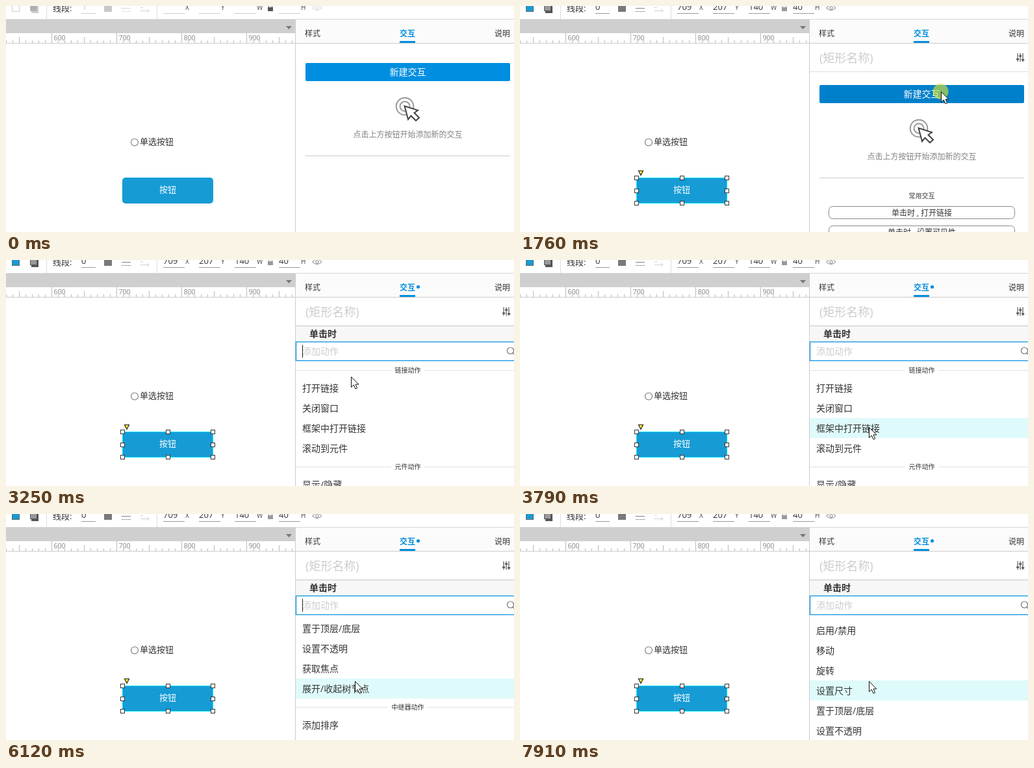
Animation of 782 by 349 pixels, one loop 8000 ms. Source, as an HTML page:

```html
<!DOCTYPE html>
<html lang="zh-CN">
<head>
<meta charset="utf-8">
<title>交互面板</title>
<style>
html, body { margin: 0; width: 100%; height: 100%; overflow: hidden; background: #fff; }
svg { display: block; width: 782px; height: 349px; font-family: "Open Sans", "Noto Sans CJK SC", "Noto Sans CJK", sans-serif; }
</style>
</head>
<body>
<svg id="stage" viewBox="0 0 782 349"></svg>
<script>
const LOOP = 8000;
const BLUE = '#008fe0', INK = '#333', HOVER = '#dffafa', LINE = '#ccc';

// --- drawing helpers ---
const rect = (x, y, w, h, fill, more = '') =>
  `<rect x="${x}" y="${y}" width="${w}" height="${h}" fill="${fill}" ${more}/>`;
const path = (d, stroke, width = 1, fill = 'none') =>
  `<path d="${d}" stroke="${stroke}" stroke-width="${width}" fill="${fill}"/>`;
const circle = (x, y, r, stroke, width = 1, fill = 'none') =>
  `<circle cx="${x}" cy="${y}" r="${r}" stroke="${stroke}" stroke-width="${width}" fill="${fill}"/>`;
// cy is the middle of the glyphs
const text = (s, x, cy, size, fill = INK, more = '') =>
  `<text x="${x}" y="${Math.round(cy + size * 0.38)}" font-size="${size}" fill="${fill}" ${more}>${s}</text>`;
const mid = (s, x, cy, size, fill, more = '') =>
  text(s, x, cy, size, fill, `text-anchor="middle" ${more}`);
const group = (id, body, more = '') => `<g id="${id}" ${more}>${body}</g>`;

// --- toolbar ---
const fields = [[242, 'X', '709'], [297, 'Y', '207'], [352, 'W', '140'], [420, 'H', '40']];

function tools(on) {
  const line = on ? '#999' : '#ccc';
  const soft = on ? '#808080' : '#d4d4d4';
  const number = (s, x) => `<text x="${x}" y="6" font-size="13" fill="${on ? INK : '#bbb'}">${s}</text>`;
  let s = rect(9.5, -3.5, 11, 12, on ? '#169bd5' : '#fff', `stroke="${on ? '#666' : '#ccc'}"`)
    + rect(39, 0, 11, 11, on ? '#555' : '#ccc')
    + rect(37.5, -3.5, 10, 11, on ? '#999' : '#b0b0b0', `stroke="${on ? '#555' : '#bbb'}"`)
    + number(on ? 0 : 1, on ? 116 : 117) + rect(116, 11, 22, 1, line)
    + rect(151, -3, 12, 12, on ? '#797979' : '#c8c8c8')
    + path('M178 3.5H192', soft) + path('M178 8.5H192', soft, 1, 'none" stroke-dasharray="2 1')
    + path('M207 2.5H211M207 7.5H220M217 4.5L220 7.5L217 10.5', '#d0d0d0')
    + path('M471.5 3Q479 -5 486 3Q479 10 471.5 3Z', soft) + circle(479, 3, 2.2, soft)
    + rect(403, 2, 8, 6, on ? '#999' : '#555') + path('M404.5 2V-1H409.5V2', on ? '#999' : '#555');
  for (const [x, , value] of fields)
    s += rect(x, 11, 33, 1, line) + (on ? number(value, x) : '');
  return s;
}

function frame() {
  let s = rect(62, 0, 1, 20, '#ddd') + rect(232, 0, 1, 20, '#ddd')
    + `<text x="72" y="8" font-size="13" fill="${INK}">线段:</text>`;
  for (const [x, name] of fields)
    s += `<text x="${x + 34}" y="6" font-size="10" fill="#444">${name}</text>`;
  s += rect(0, 20, 782, 1, '#d8d8d8') + rect(0, 21, 445, 21, '#cfcfcf')
    + path('M431 31H440L435.5 36Z', 'none', 0, '#777');
  for (let x = 0; x < 445; x += 10) {
    const top = x % 100 === 70 ? 42 : x % 100 === 20 ? 48 : 53;
    s += rect(x, top, 1, 57 - top, '#bbb');
  }
  for (let i = 0; i < 4; i++)
    s += `<text x="${73.5 + i * 100}" y="53" font-size="10.5" fill="#888">${600 + i * 100}</text>`;
  s += rect(0, 57, 445, 1, LINE) + rect(445, 21, 1, 328, LINE)
    + rect(446, 21, 336, 36, '#fbfbfb') + rect(446, 57, 336, 1, LINE)
    + text('样式', 460, 42, 12) + text('说明', 752, 42, 12)
    + text('交互', 606, 42, 12, BLUE, 'font-weight="700"') + rect(606, 54, 24, 3, BLUE);
  return s;
}

// --- canvas widgets ---
function widgets() {
  return circle(198, 210.5, 5.5, '#777', 1.1, '#fff') + text('单选按钮', 206, 209.5, 13)
    + rect(179, 265, 140, 40, '#169bd5', 'rx="5"') + mid('按钮', 249, 283.5, 13, '#fff');
}

function selection() {
  let s = rect(179.5, 265.5, 139, 39, '#169bd5', 'stroke="#00e0ff"')
    + mid('按钮', 249, 283.5, 13, '#fff')
    + path('M182.5 254.5H189.5L186 261.5Z', '#222', 1.2, '#ffe92e');
  for (const x of [179.5, 249.5, 318.5])
    for (const y of [265.5, 285.5, 304.5])
      if (x !== 249.5 || y !== 285.5) s += rect(x - 3, y - 3, 6, 6, '#fff', 'stroke="#333"');
  return s;
}

// --- panels ---
const startBlock = id => rect(461, 88, 315, 28, BLUE, `rx="2" id="${id}"`)
  + mid('新建交互', 618.5, 102, 14, '#fff')
  + circle(614, 155, 13.3, '#999', 2) + circle(614, 155, 7.5, '#999', 2)
  + path('M613.5 154.5L619 175L623.5 169.5L631 177L636 172.5L628.5 165L634 161Z', '#444', 2, '#fff')
  + mid('点击上方按钮开始添加新的交互', 618.5, 198.5, 12, '#808080')
  + rect(461, 231, 315, 1, LINE);

function nameRow() {
  let s = text('(矩形名称)', 461, 80, 18, '#ccc') + rect(446, 101, 336, 1, '#ddd');
  [[766, 81], [770, 76], [774, 82]].forEach(([x, y]) =>
    s += rect(x - 0.5, 73, 1.2, 13, '#555') + rect(x - 1.8, y, 4, 2.4, '#555'));
  return s;
}

const common = () => mid('常用交互', 618.5, 293, 10, '#777', 'font-weight="600"')
  + ['打开链接', '设置可见性'].map((s, i) =>
    rect(475.5, 309.5 + i * 30, 286, 19, '#fff', 'rx="6" stroke="#888"')
    + mid('单击时 , ' + s, 618.5, 319 + i * 30, 12, INK)).join('');

const search = (y, x, hint, caretId) => rect(446.5, y + 0.5, 340, 29, '#fff', `stroke="${BLUE}" stroke-width="1.2"`)
  + text(hint, x, y + 14.5, 14, '#ccc') + rect(x, y + 5, 1, 20, '#222', `id="${caretId}"`)
  + circle(776.5, y + 14, 5, '#777', 1.2) + path(`M780 ${y + 17.5}L784 ${y + 22}`, '#777', 1.2);

const divider = (s, y) => {
  const half = s.length * 5 + 5.5;
  return rect(446, y, 172.5 - half, 1, '#e2e2e2') + rect(618.5 + half, y, 163.5 - half, 1, '#e2e2e2')
    + mid(s, 618.5, y, 10, INK);
};

const events = ['单击时', '双击时', '鼠标右击时', '鼠标按下时', '鼠标松开时', '鼠标移动时', '鼠标移入时'];
const eventList = () => divider('事件', 146) + rect(446, 158, 336, 30, HOVER, 'id="eventHover"')
  + events.map((s, i) => text(s, 461, 173 + i * 30, 14)).join('');

const actions = {
  链接动作: '打开链接 关闭窗口 框架中打开链接 滚动到元件',
  元件动作: '显示/隐藏 设置面板状态 设置文本 设置图片 设置选中 设置列表选中项 启用/禁用 移动 旋转 设置尺寸 置于顶层/底层 设置不透明 获取焦点 展开/收起树节点',
  中继器动作: '添加排序 移除排序 添加筛选 移除筛选 设置当前显示页面 设置每页项目数量'
};
const rows = [];
function actionList() {
  let y = 170, s = '';
  for (const title in actions) {
    s += divider(title, y);
    y += 28;
    for (const name of actions[title].split(' ')) {
      rows.push(y);
      s += text(name, 456, y, 14);
      y += 31;
    }
    y -= 3;
  }
  return rect(446, 0, 336, 31, HOVER, 'id="actionHover"') + s;
}

const stage = document.getElementById('stage');
stage.innerHTML = '<clipPath id="listArea"><rect x="446" y="157" width="336" height="192"/></clipPath>'
  + frame() + group('toolsOff', tools(false)) + group('toolsOn', tools(true))
  + widgets() + rect(179.5, 265.5, 139, 39, 'none', 'rx="5" stroke="#00c8ff" id="outline"')
  + group('selected', selection())
  + group('emptyPanel', startBlock('plainButton'))
  + group('named', nameRow())
  + group('startPanel', group('shifted', startBlock('newButton'), 'transform="translate(0 34)"') + common())
  + group('eventPanel', search(102, 461, '添加交互或交互样式', 'eventCaret') + eventList())
  + group('actionPanel', circle(634.5, 41.5, 2.6, 'none', 0, BLUE)
    + rect(446, 102, 336, 24, '#f7f7f7') + rect(446, 101, 336, 1.5, '#d4d4d4')
    + text('单击时', 467, 114, 14, INK, 'font-weight="700"')
    + `<g clip-path="url(#listArea)">${group('list', actionList())}</g>`
    + search(126, 456, '添加动作', 'actionCaret'))
  + group('cursor', circle(-0.5, 0, 12, 'none', 0, '#d8e32e" fill-opacity=".62" id="press')
    + path('M.5 .5V16.5L4.3 13L7 19L9.6 17.9L7 12H11.8Z', '#111', 1, '#fff'));

const el = {};
stage.querySelectorAll('[id]').forEach(n => el[n.id] = n);

// --- timeline ---
// stepped pointer moves: first step, last step, count, end x, end y
const moves = [
  [210, 210, 1, 229, 333], [370, 660, 4, 218, 273], [1140, 1380, 4, 668, 153],
  [1600, 1760, 3, 648, 132], [1910, 2380, 7, 589, 171], [2460, 2610, 2, 583, 174],
  [2780, 3250, 6, 531, 180], [3330, 3560, 4, 536, 240], [3630, 3780, 3, 537, 258]
];
const scrolls = [[0, 0], [3860, 120], [4010, 240], [4870, 360], [5040, 480], [6670, 593], [7830, 473], [7910, 353]];
const blinks = [1910, 2440, 2780, 3500, 4040, 4570, 5040, 5590, 6120, 6670, 7220, 7680];

function pointer(t) {
  let x = 229, y = 333;
  for (const [start, end, count, toX, toY] of moves) {
    if (t < start) break;
    const gap = count > 1 ? (end - start) / (count - 1) : 1;
    const k = Math.min(count, Math.floor((t - start) / gap + 1e-6) + 1) / count;
    x += (toX - x) * k;
    y += (toY - y) * k;
  }
  return [Math.round(x), Math.round(y)];
}

const show = (node, on) => node.style.display = on ? '' : 'none';
const within = (t, a, b) => t >= a && t < b;

function draw(t) {
  const [x, y] = pointer(t);
  const picked = t >= 850;
  show(el.toolsOff, !picked);
  show(el.emptyPanel, !picked);
  for (const name of ['toolsOn', 'selected', 'named']) show(el[name], picked);
  show(el.outline, !picked && t >= 210 && y < 305);
  show(el.startPanel, within(t, 850, 1910));
  show(el.eventPanel, within(t, 1910, 2780));
  show(el.actionPanel, t >= 2780);

  const overNew = within(x, 461, 776) && within(y, 122, 150);
  el.newButton.setAttribute('fill', overNew ? '#0080ca' : BLUE);

  const event = Math.floor((y - 158) / 30);
  show(el.eventHover, event >= 0);
  el.eventHover.setAttribute('y', 158 + Math.max(0, event) * 30);

  const scroll = scrolls.filter(s => s[0] <= t).pop()[1];
  const row = rows.find(c => within(y + scroll, c - 16, c + 15));
  el.list.setAttribute('transform', `translate(0 ${-scroll})`);
  show(el.actionHover, row !== undefined);
  if (row !== undefined) el.actionHover.setAttribute('y', row - 16);

  const caret = blinks.filter(b => b <= t).length % 2 === 1;
  show(el.eventCaret, caret);
  show(el.actionCaret, caret);

  show(el.cursor, t >= 210);
  show(el.press, within(t, 1760, 1910) || within(t, 2610, 2780));
  el.cursor.setAttribute('transform', `translate(${x} ${y})`);
}

const began = performance.now();
function tick() {
  draw((performance.now() - began) % LOOP);
  requestAnimationFrame(tick);
}
tick();
</script>
</body>
</html>
```
